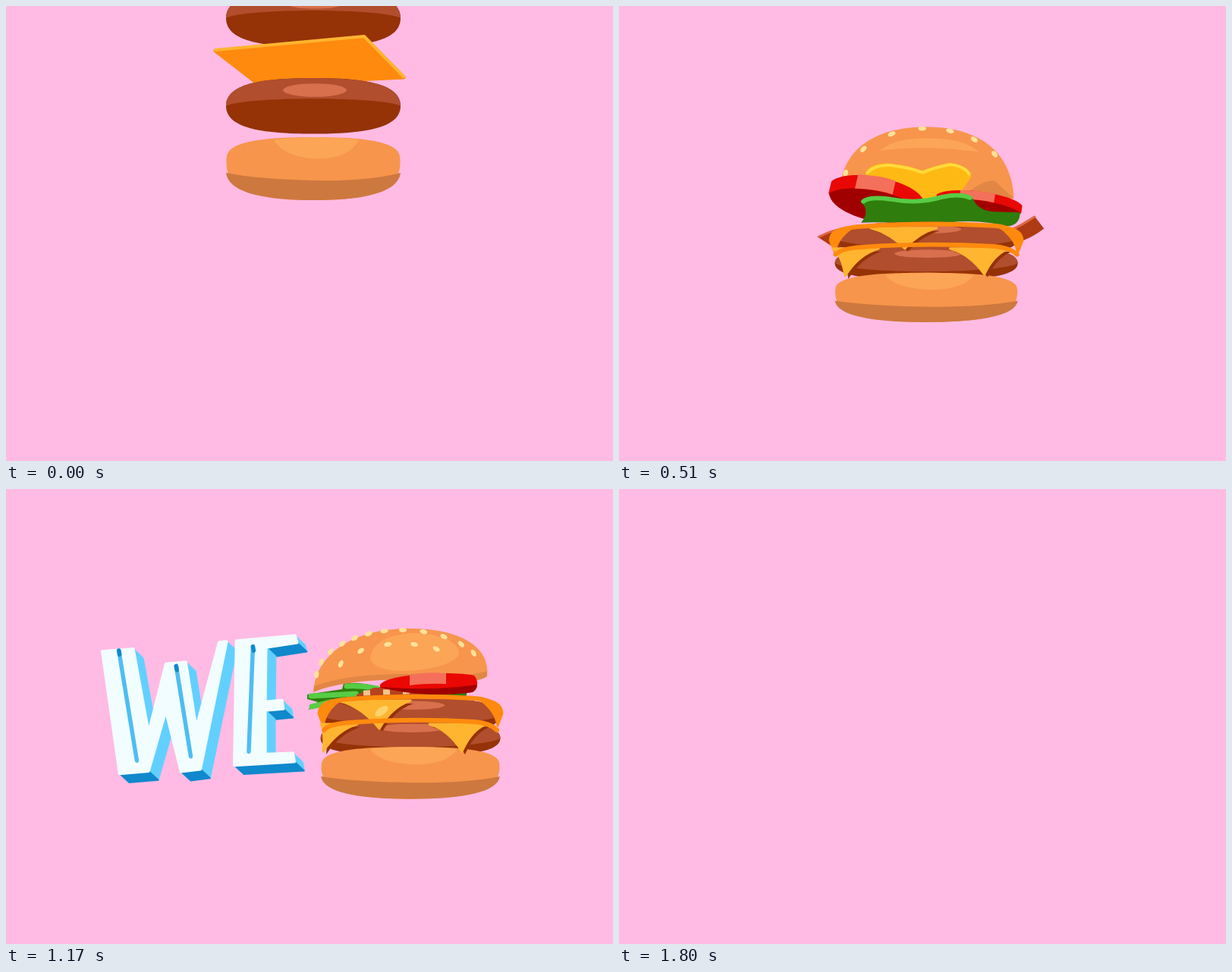
An HTML page that plays this animation: 800 by 600 pixels, repeating every 2.13 s.

```html
<!DOCTYPE html>
<html lang="en">
<head>
<meta charset="utf-8">
<title>We burger</title>
<style>
html, body { margin: 0; width: 100%; height: 100%; overflow: hidden; background: #ffbbe4; }
svg { display: block; width: 100vw; height: 100vh; }
</style>
</head>
<body>
<svg id="stage" viewBox="0 0 800 600"></svg>
<script>
const LOOP = 2130, STEP = 30, FALL_SPEED = 1.36;
const IMPACT = 420, HOP = 780, TURN = 840, GROW = 1287, EXIT = 1650, END = 1800;
const BUN = '#f7954c', CRUST = '#cd783f', GLOW = '#fca556', SEED = '#ffe29a';
const MEAT = '#b04e2d', CHAR = '#953206', SHINE = '#d8704e';
const CHEESE = '#ffb530', RIND = '#ff8a0e', RED = '#ea0804', WINE = '#a00000', ROSE = '#f4705a';
const LEAF = '#2f7d0c', LIME = '#57cc45', KETCHUP = '#dc3636';

// ---- drawing helpers ----
const path = (d, fill, more = '') => `<path d="${d}" fill="${fill}" ${more}/>`;
const line = (d, color, width, more = '') =>
  path(d, 'none', `stroke="${color}" stroke-width="${width}" stroke-linecap="round" stroke-linejoin="round" ${more}`);
const soft = (d, color, width) =>
  path(d, color, `stroke="${color}" stroke-width="${width}" stroke-linejoin="round"`);
const oval = (x, y, rx, ry, fill, turn = 0) =>
  `<ellipse cx="${x}" cy="${y}" rx="${rx}" ry="${ry}" fill="${fill}" transform="rotate(${turn} ${x} ${y})"/>`;
const place = (art, x, y, turn = 0, sx = 1, sy = sx) =>
  `<g transform="translate(${x} ${y}) rotate(${turn}) scale(${sx} ${sy})">${art}</g>`;

// Sesame along an arc, between two angles in degrees.
function seeds(cx, cy, rx, ry, from, to, n) {
  let art = '';
  for (let i = 0; i < n; i++) {
    const deg = from + (to - from) * (i + .25 * Math.sin(i * 7)) / (n - 1), a = deg * Math.PI / 180;
    art += oval(cx + rx * Math.cos(a), cy + ry * Math.sin(a), 5, 3, SEED, deg + 90);
  }
  return art;
}

// A slice hanging over a patty: a rim and folded corners [left, tipX, tipY, right].
function drape(y, ...corners) {
  const fold = ([a, x, tip, b]) => {
    const d = `M${a} ${y}Q${(a + x) / 2 + 4} ${y + 8} ${x} ${tip}Q${(b + x) / 2 - 4} ${y + 8} ${b} ${y}Z`;
    return path(d, CHAR, 'transform="translate(4 4)"') + soft(d, CHEESE, 3);
  };
  return corners.map(fold).join('') + line(`M-114 ${y + 8}Q-108 ${y} -80 ${y - 2}Q0 ${y - 8} 85 ${y - 3}Q106 ${y - 1} 114 ${y + 8}`, RIND, 6);
}
const flaps = y => [-1, 1].map(side =>
  place(soft('M92 0Q120 0 121 18L115 34Q112 14 92 0Z', RIND, 3), 0, y, 0, side, 1)).join('');

const bun =
  path('M-114 20C-110 2 -50 0 0 0S110 2 114 20C118 48 100 67 0 67S-118 48 -114 20Z', BUN) +
  path('M-52 3Q0 -3 60 3Q48 22 8 23Q-38 22 -52 3Z', GLOW) +
  path('M-115 38Q-70 45 0 46T115 38C112 58 70 67 0 67S-112 58 -115 38Z', CRUST);
const patty = lit =>
  path('M-115 23C-115 5 -70 0 0 0S115 5 115 23S70 46 0 46S-115 41 -115 23Z', CHAR) +
  path(`M-115 23C-115 5 -70 0 0 0S115 5 115 23C90 ${lit} -90 ${lit} -115 23Z`, MEAT) +
  oval(2, 10, 42, 5.5, SHINE);
const tomato =
  oval(0, 1, 59, 18, WINE) +
  path('M-59 -7C-42 -22 42 -22 59 -7V4C42 -10 -42 -10 -59 4Z', RED) +
  path('M-28 -17Q0 -20 20 -18V-6Q0 -8 -28 -5Z', ROSE);
const slice = d => soft(d, RIND, 5);
const raw = patty(15), grilled = patty(38);

const lid =
  path('M-110 42C-100 -20 -90 -60 0 -70S105 -20 111 42Z', BUN) + oval(0, 42, 111, 33, CRUST) +
  path('M-80 38Q-75 28 -45 30Q0 22 45 27Q60 35 45 44Q85 45 80 55Q40 55 10 70Q-60 75 -55 63Q-30 55 -60 52Q-80 48 -80 38Z', '#ffa91e');
const tiltedLid =
  path('M-108 225C-100 170 -55 148 0 148C70 148 108 185 110 245Q0 270 -108 240Z', BUN) +
  path('M-58 180Q-40 163 0 163Q50 163 66 182Q0 172 -58 180Z', GLOW) +
  path('M52 238Q70 220 86 221L110 245Z', CRUST, 'opacity=".5"') +
  soft('M-74 212Q-70 199 -45 200Q-20 203 -5 210Q10 203 30 199Q52 203 54 215L35 245H-60Z', '#ffb914', 5) +
  line('M-74 210Q-65 199 -45 200Q-20 203 -5 210Q10 203 30 199Q48 201 54 212', '#ffdb3c', 4) +
  seeds(0, 232, 105, 82, 195, 330, 7);
const looseLeaf =
  path('M-92 125L-10 121Q15 114 40 125L108 127V133L100 140L108 148L65 150Q50 160 -15 157Q-50 150 -98 153V147L-88 138L-92 132Z', LEAF) +
  line('M-89 128L-10 124Q15 117 40 128L106 130', LIME, 6);
const leaf =
  path('M-82 250Q-75 240 -45 244Q-10 250 20 241Q45 236 58 244Q65 262 85 263L118 264Q118 282 100 283Q60 270 0 282Q-50 276 -82 278Q-70 262 -82 250Z', LEAF) +
  line('M-79 249Q-72 242 -45 246Q-10 253 20 243Q42 238 55 244', LIME, 6);
const bacon =
  path('M-137 223C-75 190 -45 232 -20 222C10 212 30 195 60 212C95 228 115 210 136 195L148 212C120 235 95 238 60 226C30 212 10 236 -20 232C-50 222 -75 225 -113 240Z', '#ae3a14') +
  line('M-135 223C-75 190 -45 232 -20 222C10 212 30 195 60 212C95 228 115 210 136 196', '#e0663f', 3);

// ---- layers, back to front: `air` art stands in place at time `at`, `set` art rests from `land` on ----
const layers = [
  { air: lid, set: tiltedLid, at: 300, land: 440 },
  { air: place(tomato, 54, 91, 10), set: place(tomato, 66, 254, 8, .92, 1), at: 300, land: 430 },
  { air: place(tomato, -67, 114, 4), set: place(tomato, -64, 245, 12, 1, 1.6), at: 300, land: 405 },
  { air: looseLeaf, set: leaf, at: 300, land: 405 },
  { air: bacon, set: place(bacon, 0, 74), at: 300, land: 370 },
  { air: slice('M-128 263L-58 230L135 244L50 275Z') + line('M-128 262L-58 229L135 244', CHEESE, 4), at: 300, land: 360 },
  { air: raw, set: grilled, at: 0, land: 240, airY: -22, setY: 277, tall: .65 },
  { air: slice('M-129 59L67 41L119 94L-72 103Z') + line('M-129 58L67 40L119 93', CHEESE, 4), at: 0, land: 180 },
  { air: raw, set: grilled, at: 0, land: 180, airY: 95, setY: 310, tall: .6 },
  { set: drape(285, [-70, -27, 313, 13]) + flaps(284), land: 360 },
  { air: bun, set: bun, at: 0, land: 150, airY: 173, setY: 346, tall: .24 },
  { set: line('M-112 350Q-60 338 -8 347M36 346Q70 340 104 346M-124 353H-112', KETCHUP, 9), land: 150, until: 510 },
  { set: drape(313, [-118, -102, 350, -60], [30, 73, 348, 104]), land: 180 }
];

// ---- the burger seen from its other side ----
const served =
  path('M-136 271L-90 264L-88 256Q-60 255 -42 261H74V272L60 285H-110L-135 291L-122 281L-136 277Z', LEAF) +
  line('M-131 273L-72 270M-84 260Q-64 259 -44 263M-130 287L-105 281', LIME, 7) +
  path('M-71 271L-48 262H29L12 281L-71 275Z', '#b5431d') +
  line('M-62 269L22 266', '#f3c48e', 7, 'stroke-dasharray="9 17" style="stroke-linecap:butt"') +
  path('M-128 268C-126 225 -85 184 0 184C60 184 106 205 101 247C85 260 20 250 -40 252C-80 254 -110 260 -128 268Z', BUN) +
  path('M-127 260C-90 246 -40 244 0 244S80 248 101 240V247C85 260 20 250 -40 252C-80 254 -110 260 -128 268Z', CRUST, 'opacity=".5"') +
  path('M-53 222C-50 200 -20 189 10 190S66 203 64 218C55 240 -50 252 -53 222Z', GLOW) +
  seeds(-12, 250, 112, 64, 185, 325, 12) + seeds(-12, 250, 88, 46, 205, 300, 5) +
  path('M-40 258C-30 243 60 240 84 246Q91 254 86 264C60 274 0 271 -40 262Z', RED) +
  path('M-1 245Q20 241 47 243V257Q20 256 -1 259Z', ROSE) +
  path('M-40 261Q0 264 30 263T88 258Q88 264 82 268C50 273 0 273 -40 261Z', WINE) +
  place(grilled, 0, 275, 0, 1.03) + place(grilled, 0, 305, 0, 1.03) +
  drape(279, [-95, -41, 316, 0]) + flaps(278) +
  oval(-38, 293, 10, 5, '#ffd36a', -35) +
  place(bun, 0, 340, 0, 1.025) +
  drape(310, [-118, -115, 346, -70], [25, 68, 346, 100]);

// ---- extruded lettering ----
const DEPTH = [14, 12];
const letters = [
  [[95, 211], [140, 208], [162, 318], [187, 228], [216, 226], [231, 312], [264, 200], [275, 199], [237, 367], [209, 370], [187, 290], [162, 369], [120, 372]],
  [[289, 198], [374, 192], [377, 201], [332, 207], [331, 279], [355, 277], [357, 288], [331, 290], [331, 348], [371, 347], [373, 358], [286, 362]]
];
function sides(pts) {
  return pts.map(([x, y], i) => {
    const [u, v] = pts[(i + 1) % pts.length], nx = v - y, ny = x - u;
    if (nx * DEPTH[0] + ny * DEPTH[1] <= 0) return '';
    const color = Math.abs(ny) > Math.abs(nx) ? '#1088cc' : '#62d0ff';
    return soft(`M${x} ${y}L${u} ${v}l${DEPTH}L${x + DEPTH[0]} ${y + DEPTH[1]}Z`, color, 2);
  }).join('');
}
const slot = (x, y, u, v) => line(`M${x} ${y}L${u} ${v}`, '#4fbdf2', 6) + line(`M${x} ${y}l1 5`, '#1088cc', 6);
const word = letters.map(pts => sides(pts) + soft('M' + pts.join('L') + 'Z', '#f2fdff', 4)).join('') +
  slot(119, 210, 145, 355) + slot(202, 231, 223, 350) + slot(313, 206, 307, 344);

// ---- scene ----
const stage = document.getElementById('stage');
stage.innerHTML = `<g id="scene"><circle id="disc" fill="#ff9acb"/>
  <g id="word">${word}</g>
  ${line('M500 412C400 412 250 414 150 389', '#fff', 7, 'id="swoosh" pathLength="100"')}
  <g id="burger"><g id="stack">${layers.map(l => `<g><g>${l.air || ''}</g><g>${l.set || ''}</g></g>`).join('')}</g>
  <g id="served">${served}</g></g></g>`;
const [scene, disc, wordmark, swoosh, burger, stack, meal] =
  ['scene', 'disc', 'word', 'swoosh', 'burger', 'stack', 'served'].map(id => document.getElementById(id));

const show = (el, on) => el.setAttribute('display', on ? 'inline' : 'none');
const move = (el, s) => el.setAttribute('transform', s);
const span = (t, from, to) => Math.min(1, Math.max(0, (t - from) / (to - from)));
const smooth = p => p * p * (3 - 2 * p);
const decay = (t, from, to) => (1 - span(t, from, to)) ** 3.6;
// Swings from 1 around 0, one half turn per `half` ms, at rest by `to`.
const spring = (t, from, to, half) => Math.cos(Math.PI * Math.max(0, t - from) / half) * decay(t, from, to);

function drawStack(t) {
  const sink = 26 * (1 - smooth(span(t, IMPACT, 540)));
  layers.forEach(({ at = 0, land, airY = 0, setY = 0, tall = 0, until = LOOP }, i) => {
    const [air, set] = stack.children[i].children;
    show(air, t < land);
    show(set, t >= land && t < until);
    move(air, `translate(0 ${airY + FALL_SPEED * (t - at)}) scale(1 ${1 + tall * span(land - t, 0, 150)})`);
    move(set, `translate(0 ${setY + sink})`);
  });
}

function drawWord(t) {
  const swing = 235 * spring(t, TURN, 1620, 170);
  const left = 95 + swing, right = 388 + swing * .18, stretch = (right - left) / 293;
  show(wordmark, t >= HOP);
  move(wordmark, `matrix(${stretch} ${(stretch - 1) * .07} 0 1 ${left - 95 * stretch} ${(1 - stretch) * 44})`);

  const head = 19 + 81 * smooth(span(t, HOP, 990)), tail = 9 + 91 * span(t, HOP, 1080) ** 1.2;
  show(swoosh, t >= HOP && tail < head);
  swoosh.setAttribute('stroke-dasharray', `${Math.max(0, head - tail)} 200`);
  swoosh.setAttribute('stroke-dashoffset', -tail);
}

function draw(t) {
  show(scene, t < END);
  move(scene, `translate(425 300) scale(${1 - span(t, EXIT, END) ** 2}) translate(-425 -300)`);

  const grow = Math.sin(span(t, GROW, GROW + 330) * Math.PI / 2);
  disc.setAttribute('r', 376 * grow);
  disc.setAttribute('cx', 401 + 24 * grow);
  disc.setAttribute('cy', 299 - 2 * grow);

  drawWord(t);
  drawStack(t);
  const wobble = .25 * Math.sin(Math.PI * (t - IMPACT) / 110) * (t > IMPACT) * decay(t, IMPACT, HOP);
  const x = 533 - 128 * spring(t, HOP, 1214, 120);
  move(burger, `translate(${x} 413) scale(${1 + wobble} ${1 - wobble * .6}) translate(0 -413)`);
  show(stack, t < TURN);
  show(meal, t >= TURN);
}

const start = performance.now();
function tick() {
  const t = (performance.now() - start) % LOOP;
  draw(Math.floor(t / STEP) * STEP);
  requestAnimationFrame(tick);
}
tick();
</script>
</body>
</html>
```
